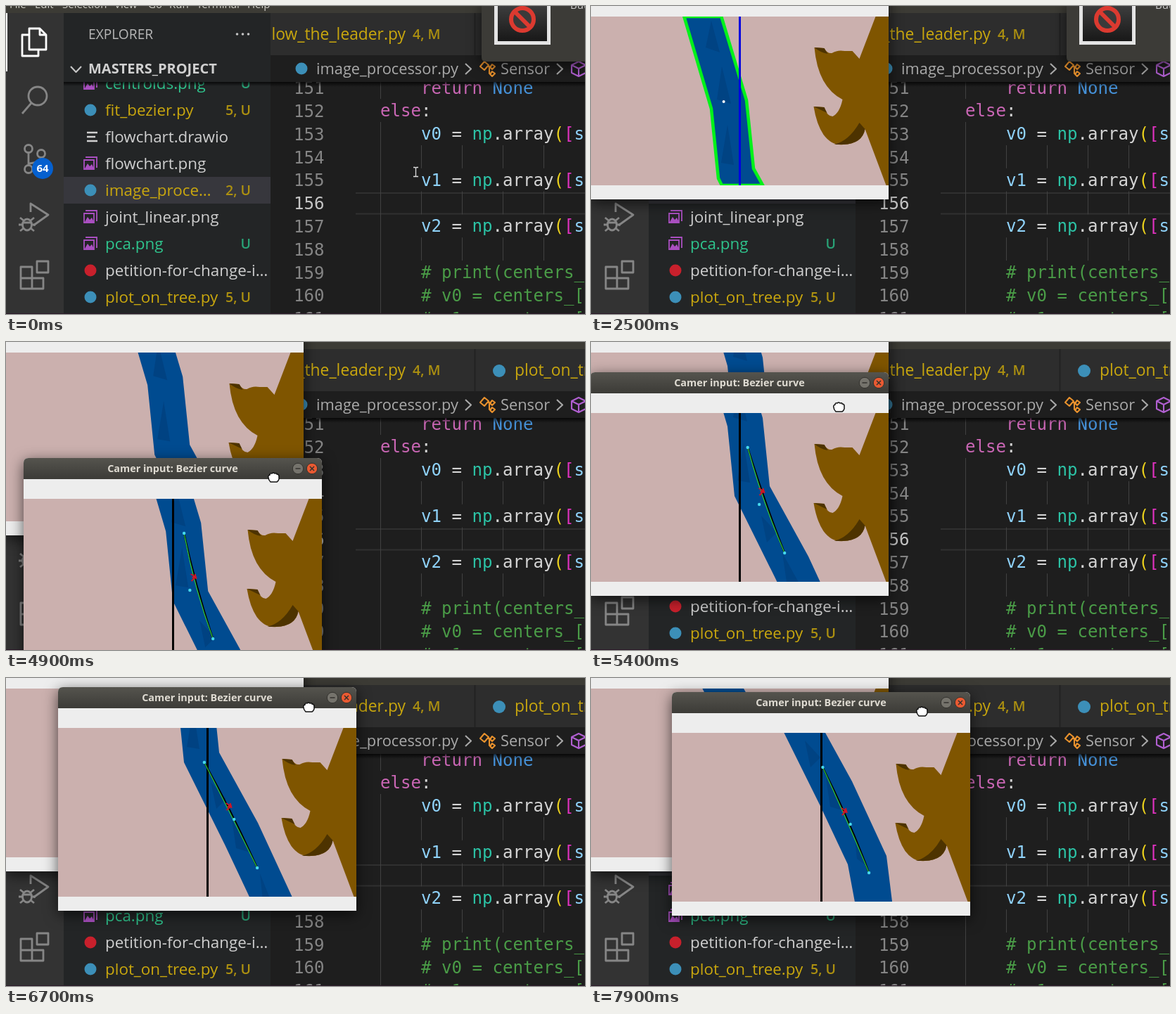
Recreate the animation shown at these times as an HTML page. Size 823x438 px, loop 8 s.

```html
<!DOCTYPE html>
<html lang="en">
<head>
<meta charset="utf-8">
<title>Editor and camera windows</title>
<style>
html, body { margin: 0; width: 100%; height: 100%; overflow: hidden; background: #1e1e1e; }
svg { display: block; width: 823px; height: 438px; }
text { font-family: "Open Sans", "Noto Sans", sans-serif; font-size: 22.4px; fill: #d0d0d0; white-space: pre; }
.code text { font-family: "DejaVu Sans Mono", monospace; font-size: 24.08px; }
.menu text { font-size: 15px; }
text.badge { font-size: 19.5px; font-weight: 600; }
text.crumb { font-size: 21.8px; fill: #a9a9a9; }
text.tab { font-size: 22.8px; fill: #c9a70e; }
.line { fill: none; stroke: #868686; stroke-width: 2.8; stroke-linejoin: round; }
.thin { stroke-width: 2.1; }
.py { fill: #3c8fb8; }
.shadow { filter: drop-shadow(0 5px 10px rgba(0, 0, 0, .65)); }
</style>
</head>
<body>
<svg viewBox="0 0 823 438">
  <defs>
    <clipPath id="stageView"><rect width="424" height="240"/></clipPath>
    <clipPath id="listArea"><rect x="82" y="108" width="294" height="330"/></clipPath>
    <clipPath id="tabArea"><rect x="376" y="10" width="447" height="60"/></clipPath>
    <clipPath id="codeArea"><rect x="376" y="108" width="447" height="330"/></clipPath>
    <linearGradient id="fade" x2="0" y2="1"><stop stop-opacity=".75"/><stop offset="1" stop-opacity="0"/></linearGradient>
    <linearGradient id="titleFill" x2="0" y2="1"><stop stop-color="#55544e"/><stop offset="1" stop-color="#3c3b37"/></linearGradient>
    <linearGradient id="photo" x2="0" y2="1"><stop stop-color="#444"/><stop offset="1" stop-color="#181818"/></linearGradient>
    <g id="imageIcon" fill="none" stroke="#a94fc0" stroke-width="1.8">
      <path d="M-6 -8V-9H9V5H8M-9 -5H5V8H-9Z"/><path d="M-8 7L-4 0L-1 4L2 1L5 7Z" fill="#a94fc0" stroke="none"/>
    </g>
    <g id="linesIcon" stroke="#d0d0d0" stroke-width="2.4"><path d="M-5 -6H10M-5 0H7M-5 6H10"/></g>
    <g id="scene" clip-path="url(#stageView)">
      <rect width="424" height="240" fill="#cbb0ae"/>
      <polygon id="road" fill="#004b90"/>
      <g id="ripples" fill="#003c78" opacity=".55">
        <path d="M-45 -145L-32 -92L-52 -98ZM-37 -62L-28 -5L-46 -8ZM-60 -210L-48 -165L-68 -172Z"/>
        <path d="M-12 42L10 66L-4 80ZM18 95L44 142L24 136ZM58 172L78 222L62 210Z"/>
      </g>
      <g transform="translate(1.500 0)">
        <path fill="#7f5500" d="M404 0H424V240H419L389 160Q385 181 358 182Q342 184 330 168Q320 153 316 128L331 129Q335 142 343 142Q353 137 357 118Q322 100 317 44L331 45Q335 53 342 52Q350 47 360 49L371 49L381 60Z"/>
        <path fill="#4d3300" d="M317 44L331 45L336 53Q325 51 317 44ZM316 128L331 129L335 137ZM345 182Q366 177 381 151L389 160Q385 181 358 182Z"/>
      </g>
    </g>
  </defs>

  <g id="editor">
    <rect width="823" height="438" fill="#1e1e1e"/>
    <rect x="376" y="10" width="447" height="60" fill="#2d2d2d"/>
    <path d="M666.5 10V70" stroke="#222" stroke-width="2"/>
    <g clip-path="url(#tabArea)">
      <text class="tab" x="568" y="48" text-anchor="end">follow_the_leader.py</text>
      <text class="badge" x="578" y="47" style="fill:#ac9010">4, M</text>
      <circle class="py" cx="701" cy="41" r="9"/>
      <text class="tab" x="723" y="48">plot_on_tree.py</text>
    </g>
    <circle class="py" cx="420" cy="89" r="8.500"/>
    <text class="crumb" x="441" y="97">image_processor.py</text>
    <text class="crumb" x="703" y="97">Sensor</text>
    <path class="line thin" d="M653 82L661 89.500L653 97M783 82L791 89.500L783 97" style="stroke:#a9a9a9"/>
    <path class="line thin" style="stroke:#e8912d" d="M680 79L686 84L680 91L674 86ZM684 86H690M687 86V96H690M691 83L695 86L691 90L688 87ZM691 93L695 96L691 100L688 97Z"/>
    <path class="line thin" style="stroke:#b05fd0" d="M814 79L824 84V95L814 100L804 95V84ZM804 84L814 89L824 84M814 89V100"/>
    <g class="code" id="code" clip-path="url(#codeArea)"></g>
    <rect x="376" y="108" width="447" height="7" fill="url(#fade)"/>

    <rect x="82" y="10" width="294" height="428" fill="#232526"/>
    <g id="files" clip-path="url(#listArea)"><rect x="82" y="243" width="294" height="38" fill="#37373d"/></g>
    <rect x="82" y="108" width="294" height="6" fill="url(#fade)"/>
    <text x="117" y="47" style="font-size:19.200px;fill:#b8b8b8">EXPLORER</text>
    <g fill="#c5c5c5"><circle cx="328.500" cy="40" r="1.800"/><circle cx="336.500" cy="40" r="1.800"/><circle cx="344.500" cy="40" r="1.800"/></g>
    <path class="line thin" style="stroke:#c5c5c5" d="M92 86L99.500 94L107 86"/>
    <text x="117" y="96" style="font-size:20px;font-weight:700">MASTERS_PROJECT</text>
    <rect id="scrollbar" x="358" y="216" width="17" height="197" fill="#797979" opacity="0"/>

    <rect y="10" width="82" height="428" fill="#333"/>
    <rect y="10" width="2" height="83" fill="#fff"/>
    <path class="line" style="stroke:#fff" d="M33 32H48L57 41V62H33ZM48 32V41H57M33 41H23V71H46V62"/>
    <g class="line">
      <circle cx="45" cy="128" r="13"/><path d="M36 138L23 153"/>
      <circle cx="32" cy="203" r="5.500"/><circle cx="50" cy="210" r="5.500"/><circle cx="32" cy="232" r="5.500"/>
      <path d="M32 209V226M50 216Q49 222 33 224"/>
      <path d="M35 293V281L60 297L39 312"/><ellipse cx="30" cy="311" rx="6.500" ry="8"/>
      <path d="M24 308H36M20 301L25 305M40 301L35 305M18 311H24M36 311H42M20 320L25 316M40 320L35 316"/>
      <path d="M21 371H37V402H21ZM21 387H53V402H37M37 387H53V402M44 363H60V379H44Z"/>
    </g>
    <circle cx="52" cy="231" r="15" fill="#0560cf"/>
    <text x="52" y="236" text-anchor="middle" style="font-size:15px;font-weight:700;fill:#fff">64</text>
    <rect width="823" height="10" fill="#3c3b35"/>
    <g class="menu" id="menu"></g>
    <rect y="437" width="823" height="1" fill="#2c1a29"/>
  </g>

  <path id="beam" d="M579 229.500H581.500L582.500 230.500L583.500 229.500H586M582.500 230V242M579 242.500H586" fill="none" stroke="#ddd" stroke-width="1.300"/>

  <g id="popup">
    <path class="shadow" d="M676 -5H830V79H682Q676 79 676 73Z" fill="#3c3b37"/>
    <rect x="694" y="-9" width="80" height="64" fill="#e4e4e4"/>
    <rect x="699" y="-9" width="70" height="59" fill="url(#photo)"/>
    <circle cx="734" cy="19" r="16" fill="#3a3a3a" stroke="#dc3a30" stroke-width="6"/>
    <path d="M723 8L745 30" stroke="#dc3a30" stroke-width="6"/>
    <text x="802" y="4" style="font-size:15px">Button</text>
  </g>

  <g id="cameraWindow">
    <rect class="shadow" y="-30" width="423" height="305" fill="#ededed"/>
    <g transform="translate(-1 15)">
      <use href="#scene"/>
      <g id="contour" clip-path="url(#stageView)">
        <polygon id="outline" fill="none" stroke="#00f21a" stroke-width="4.500"/>
        <path d="M212.500 0V240" stroke="#0000e0" stroke-width="3"/>
        <circle id="centroid" r="2" fill="#fff"/>
      </g>
    </g>
  </g>

  <g id="curveWindow">
    <path class="shadow" d="M0 318V7Q0 0 7 0H417Q424 0 424 7V318Z" fill="#ededed"/>
    <path id="titleBar" d="M0 30V7Q0 0 7 0H417Q424 0 424 7V30Z"/>
    <text id="title" x="212" y="20" text-anchor="middle" style="font-size:14.400px;font-weight:700">Camer input: Bezier curve</text>
    <circle cx="390" cy="15" r="7.700" fill="#75736c" stroke="#33322e"/>
    <circle id="close" cx="410" cy="15" r="7.700" stroke="#33322e"/>
    <path d="M386.500 15H393.500M407 12L413 18M413 12L407 18" stroke="#33322e" stroke-width="1.500"/>
    <g transform="translate(0 58)">
      <use href="#scene"/>
      <g clip-path="url(#stageView)" fill="none">
        <path d="M212.500 0V240" stroke="#000" stroke-width="3"/>
        <path id="chord" stroke="#000" stroke-width="2.200"/>
        <path id="curve" stroke="#2fc93a" stroke-width="1.200"/>
        <path id="arrow" d="M-5 -4L2 0L-4 6M2 0L-3 1M1 -4L3 3" stroke="#d01525" stroke-width="2"/>
        <g id="dots" fill="#45d8ee"><circle r="2.200"/><circle r="2.200"/><circle r="2.200"/></g>
      </g>
    </g>
  </g>

  <path id="hand" d="M-7 0Q-8 -3 -5 -4Q-5 -7 -2 -6Q0 -8 2 -6Q5 -7 5 -5Q8 -5 8 -2V2Q7 5 5 6H-4Q-7 3 -7 0Z" fill="#fff" stroke="#111" stroke-width="1.500"/>
</svg>
<script>
const $ = id => document.getElementById(id);
const add = (parent, markup) => parent.insertAdjacentHTML("beforeend", markup);
const label = (x, y, words, color, extra = "") =>
  `<text x="${x}" y="${y}" style="fill:${color}" ${extra}>${words}</text>`;

// Menu
[["File", 5], ["Edit", 41], ["Selection", 80], ["View", 154], ["Go", 202],
 ["Run", 232], ["Terminal", 271], ["Help", 343]]
  .forEach(([word, x]) => add($("menu"), label(x, 3, word, "#d0d0c8")));

// File list
const GOLD = "#c9a70e", GREEN = "#2fc48d", PLAIN = "#cfcfcf";
[["centroids.png", "image", GREEN, "U"],
 ["fit_bezier.py", "py", GOLD, "5, U"],
 ["flowchart.drawio", "lines", PLAIN, ""],
 ["flowchart.png", "image", PLAIN, ""],
 ["image_proce…", "py", GOLD, "2, U"],
 ["joint_linear.png", "image", PLAIN, ""],
 ["pca.png", "image", GREEN, "U"],
 ["petition-for-change-i…", "pdf", PLAIN, ""],
 ["plot_on_tree.py", "py", GOLD, "5, U"]].forEach(([name, icon, color, badge], i) => {
  const y = 110 + 38 * i;
  const mark = icon === "py" ? `<circle class="py" cx="120" cy="${y}" r="8.5"/>`
    : icon === "pdf" ? `<circle cx="120" cy="${y}" r="8.5" fill="#c8202c"/>`
    : `<use href="#${icon}Icon" x="120" y="${y}"/>`;
  const dim = color === GOLD ? "#ac9010" : "#29a276";
  add($("files"), mark + label(141, y + 8, name, color) +
    label(348, y + 7, badge, dim, 'class="badge" text-anchor="end"'));
});

// Code
const CHAR = 14.5, ROW = 32.8, LEFT = 590;
const guide = (x, y, h) => `<path d="M${x + .5} ${y}v${h}" stroke="#414141"/>`;
const span = (words, color) => `<tspan style="fill:${color}">${words}</tspan>`;
const vector = name => span(name, "#8fd2fa") + span(" = ", "#d4d4d4") + span("np", "#2cc3a6") +
  span(".array", "#d4d4d4") + span("(", "#ecd21c") + span("[", "#e032c0") + span("s", "#8fd2fa");
const comment = words => span(words, "#4a9c47");
const lines = {
  151: span("return", "#c966b4") + span(" None", "#4591d8"),
  152: span("else", "#c966b4") + span(":", "#d4d4d4"),
  153: vector("v0"), 155: vector("v1"), 157: vector("v2"),
  159: comment("# print(centers_"), 160: comment("# v0 = centers_["), 161: comment("# v1 = centers_["),
};
const code = $("code");
add(code, '<path d="M497 266H823M497 295.500H823" stroke="#303030" stroke-width="2"/>');
add(code, guide(532, 108, 24) + guide(532, 165, 273));
for (let n = 151; n <= 161; n++) {
  const y = 124.6 + ROW * (n - 151);
  add(code, label(452.5, y + .5, n, n === 156 ? "#c6c6c6" : "#858585", 'text-anchor="end"'));
  if (lines[n]) add(code, `<text x="${n === 152 ? LEFT - 4 * CHAR : LEFT}" y="${y}">${lines[n]}</text>`);
  else for (let k = 0; k < 4; k++) add(code, guide(LEFT + 4 * CHAR * k, y - 25, ROW));
}

// Motion
const LOOP = 8000, STEP = 100;
const CAMERA_SHOWN = 1500, CURVE_SHOWN = 3000, POPUP_GONE = 3600, DRAG_START = 4700;

function track(keys, t) {
  const next = keys.findIndex(key => key[0] > t);
  if (next === 0) return keys[0].slice(1);
  if (next < 0) return keys[keys.length - 1].slice(1);
  const a = keys[next - 1], b = keys[next], p = (t - a[0]) / (b[0] - a[0]);
  return a.slice(1).map((v, i) => v + (b[i + 1] - v) * p);
}

// Road edges around a moving bend: [x, y]
const RIGHT_EDGE = [[-70, -297], [-10, -97], [0, 0], [55, 100], [104, 206], [128, 400]];
const LEFT_EDGE = [[-119, -285], [-60, -85], [-50, 14], [9, 133], [49, 218], [83, 400]];
const bendPath = [[1500, 197, 228], [2500, 232, 216], [3800, 278, 191],
  [5400, 255, 104], [6700, 229, 35], [7900, 201, -31]];

// time, window x, window y, pointer offset x, pointer offset y
const dragPath = [[4700, -1, 275, 355, 28], [5000, 38, 110, 355, 28], [5200, 14, 26, 355, 28],
  [5300, 8, 14, 355, 32], [5400, -1, 43, 353, 50], [5500, -1, 80, 355, 28], [5700, -1, 20, 355, 28],
  [5800, 0, 20, 355, 28], [6300, 168, 15, 356, 28], [6700, 74, 13, 356, 29], [6900, 58, 14, 355, 28],
  [7500, 163, 22, 355, 28], [7600, 160, 24, 355, 28], [7900, 115, 20, 355, 28]];

const edgeX = (edge, y) => track(edge.map(([x, py]) => [py, x]), y)[0];
const visible = edge => [[edgeX(edge, 0), 0], ...edge.filter(p => p[1] > 0 && p[1] < 240), [edgeX(edge, 240), 240]];
const place = (el, x, y) => el.setAttribute("transform", `translate(${x} ${y})`);
const show = (id, on) => $(id).style.display = on ? "" : "none";

function drawRoad(t) {
  const [bx, by] = track(bendPath, t);
  const shift = edge => edge.map(([x, y]) => [x + bx, y + by]);
  const left = shift(LEFT_EDGE), right = shift(RIGHT_EDGE);
  const points = [...visible(left), ...visible(right).reverse()].join(" ");
  $("road").setAttribute("points", points);
  $("outline").setAttribute("points", points);
  place($("ripples"), bx, by);
  const mid = y => (edgeX(left, y) + edgeX(right, y)) / 2;
  place($("centroid"), mid(121) - 6, 121);
  const [a, b, c] = [49, 130, 199].map(y => [mid(y), y]);
  [a, b, c].forEach((p, i) => place($("dots").children[i], ...p));
  // The curve bends only half way from its chord towards the middle dot.
  const pull = b.map((v, i) => v / 2 + (a[i] + c[i]) / 4);
  $("curve").setAttribute("d", `M${a}Q${pull} ${c}`);
  $("chord").setAttribute("d", `M${a}Q${pull[0] + 2} ${pull[1] - 3} ${c}`);
  place($("arrow"), (a[0] + 2 * pull[0] + c[0]) / 4 - 3, 111);
}

function draw(now) {
  const t = Math.floor((now % LOOP) / STEP) * STEP;
  show("beam", t < 500);
  show("popup", t < POPUP_GONE);
  show("cameraWindow", t >= CAMERA_SHOWN);
  show("contour", t < CURVE_SHOWN);
  show("curveWindow", t >= CURVE_SHOWN);
  show("hand", t >= DRAG_START);
  $("scrollbar").setAttribute("opacity", track([[400, 0], [600, .4], [900, .4], [1700, 0]], t)[0]);

  const focused = t >= DRAG_START;
  $("titleBar").setAttribute("fill", focused ? "url(#titleFill)" : "#3c3b37");
  $("title").style.fill = focused ? "#dfdbd2" : "#85837b";
  $("close").setAttribute("fill", focused ? "#ea5a32" : "#75736c");

  const [x, y, dx, dy] = track(dragPath, t);
  place($("curveWindow"), x, y);
  place($("hand"), x + dx, y + dy);
  drawRoad(t);
  requestAnimationFrame(() => draw(performance.now()));
}
draw(performance.now());
</script>
</body>
</html>
```
